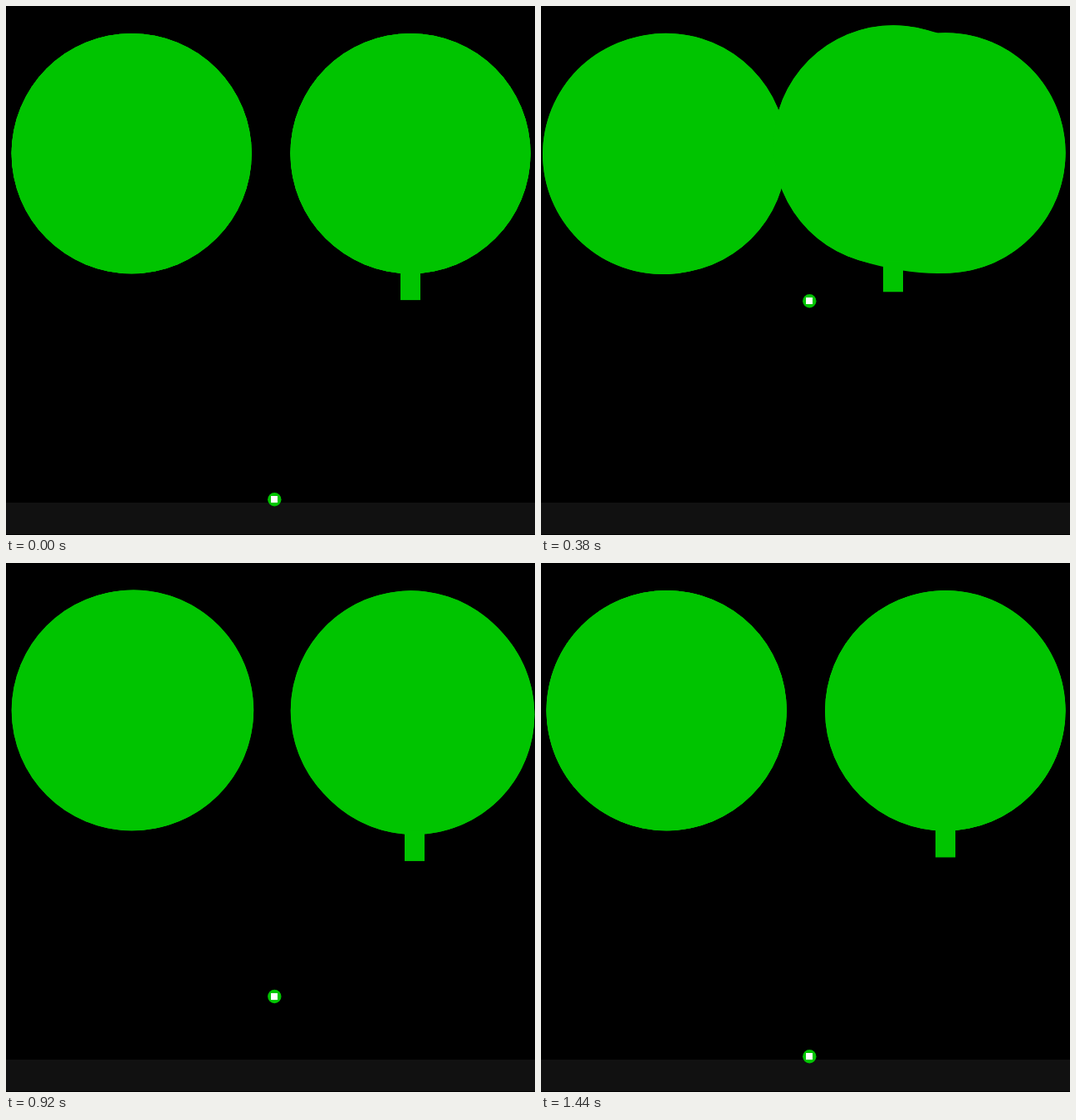
These frames come from a looping animation (637 by 637 pixels, 1460 ms). An HTML page with a canvas:

```html
<!DOCTYPE html>
<html lang="en">
<head>
<meta charset="utf-8">
<title>Springy discs</title>
<style>
  html, body { margin: 0; width: 100%; height: 100%; overflow: hidden; background: #000; }
  canvas { display: block; width: 637px; height: 637px; }
</style>
</head>
<body>
<canvas id="stage" width="637" height="637"></canvas>
<script>
const ctx = document.getElementById('stage').getContext('2d');
const SIZE = 637, LOOP = 1460, STEP = 20;
const GREEN = '#00c400', RADIUS = 144.6, REST_Y = 177.6;
const FLOOR_Y = 598, BALL_X = 323.3, BALL_REST = 594.3;
const APEX_Y = 322.2, APEX_TIME = 10, HALF_GRAVITY = 2.413e-4;

// Damped swing: rate in degrees per ms, peak is a time of full extension.
function ring(t, size, decay, rate, peak) {
  return size * Math.exp(-t / decay) * Math.cos(rate * (t - peak) * Math.PI / 180);
}

const left = {
  x: 151.2, bend: -0.18,
  swing(t) {
    const x = ring(t, 536, 175, 1.1, -33);
    return [x, -0.19 * x];
  }
};
const right = {
  x: 487, bend: 0.1, stem: true,
  swing: t => [ring(t, 430, 205, 1.02, 225), ring(t, 475, 205, 0.8, 52)]
};

function disc(x, y, radius) {
  ctx.beginPath();
  ctx.arc(x, y, radius, 0, Math.PI * 2);
  ctx.fill();
}

function drawSpring({ x, bend, stem, swing }, t) {
  const [sx, sy] = t < STEP ? [0, 0] : swing(t);
  // The root yields slightly to the pull of the free end.
  const rootX = x + 0.035 * (sx + Math.hypot(sx, sy));
  const rootY = REST_Y + 0.075 * sy;
  const endX = x + sx, endY = REST_Y + sy;
  const dx = endX - rootX, dy = endY - rootY;

  ctx.fillStyle = ctx.strokeStyle = GREEN;
  disc(rootX, rootY, RADIUS);
  disc(endX, endY, RADIUS);
  ctx.lineWidth = RADIUS * 2;
  ctx.lineCap = ctx.lineJoin = 'round';
  ctx.beginPath();
  ctx.moveTo(rootX, rootY);
  ctx.quadraticCurveTo(
    rootX + 0.35 * dx + bend * dy,
    rootY + 0.35 * dy - bend * dx,
    endX, endY
  );
  ctx.stroke();
  if (stem) ctx.fillRect(Math.round(endX - 12), endY + 140, 24, 36.5);
}

function drawBall(t) {
  const fall = APEX_Y + HALF_GRAVITY * (t - APEX_TIME) ** 2;
  const y = t < STEP ? BALL_REST : Math.min(BALL_REST, fall);
  ctx.fillStyle = GREEN;
  disc(BALL_X, y, 8.2);
  ctx.fillStyle = '#fff';
  ctx.fillRect(319, Math.round(y - 4.2), 8, 8);
}

function draw(t) {
  ctx.fillStyle = '#000';
  ctx.fillRect(0, 0, SIZE, SIZE);
  ctx.fillStyle = '#111';
  ctx.fillRect(0, FLOOR_Y, SIZE, 38);
  drawSpring(left, t);
  drawSpring(right, t);
  drawBall(t);
}

const start = performance.now();
function tick() {
  const t = (performance.now() - start) % LOOP;
  draw(Math.floor(t / STEP) * STEP);
  requestAnimationFrame(tick);
}
tick();
</script>
</body>
</html>
```
